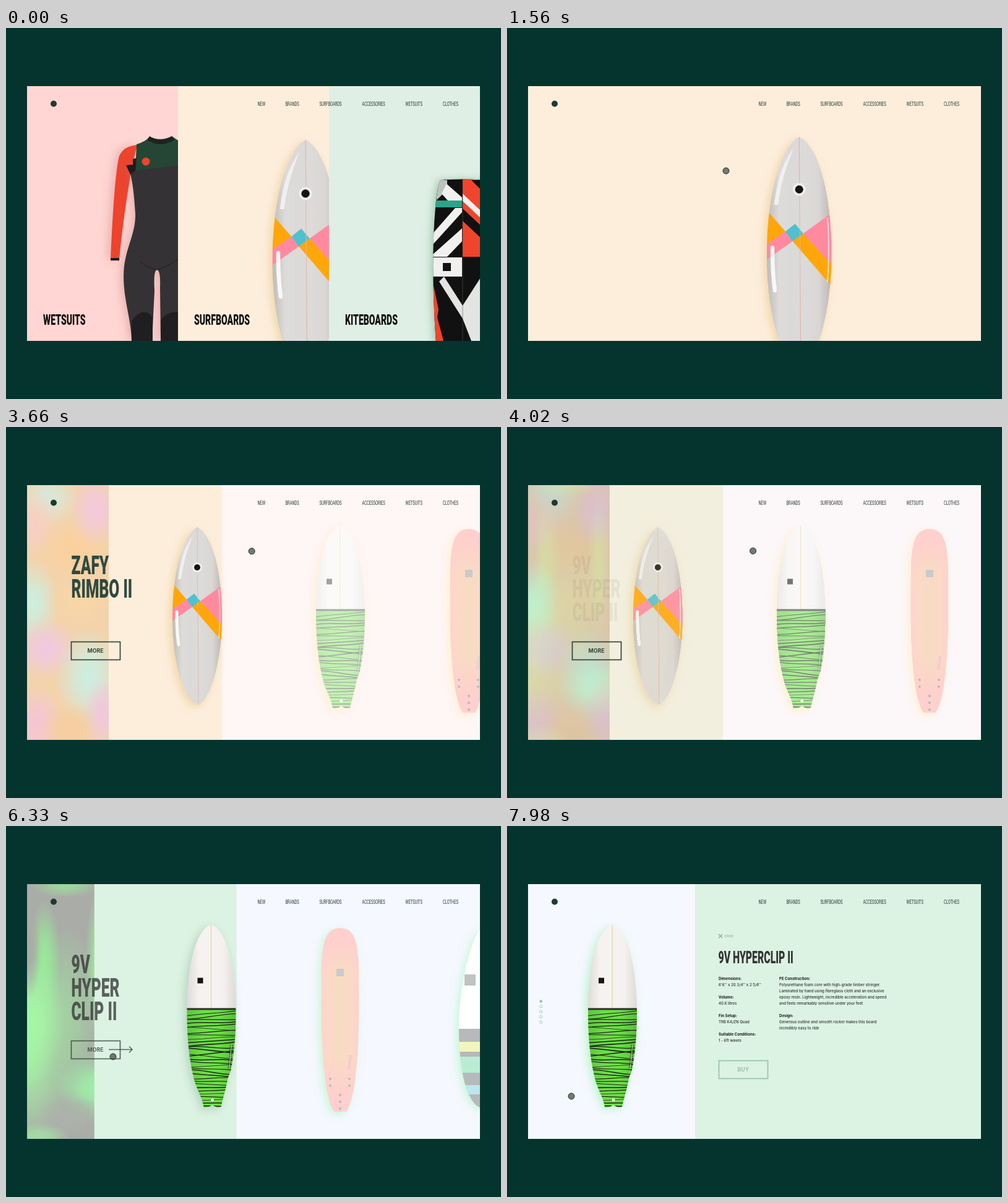
Recreate the animation shown at these times as an HTML page with a canvas. Size 800 by 600 pixels, loop 8 s.

```html
<!DOCTYPE html>
<html lang="en">
<head>
<meta charset="utf-8">
<title>Surf shop</title>
<style>
  html, body { margin: 0; width: 100%; height: 100%; overflow: hidden; background: #05342e; }
  canvas { display: block; }
</style>
</head>
<body>
<canvas id="stage" width="800" height="600"></canvas>
<script>
const LOOP = 8000;
const ctx = document.getElementById('stage').getContext('2d');
const DISPLAY = 'Roboto, "Liberation Sans", sans-serif';
const BODY = 'Inter, "Open Sans", sans-serif';

// Timing helpers
const ramp = (t, a, b) => Math.min(1, Math.max(0, (t - a) / (b - a)));
const inOut = u => u < .5 ? 4 * u ** 3 : 1 - 4 * (1 - u) ** 3;
const ease = (t, a, b) => inOut(ramp(t, a, b));
const mix = (a, b, k) => a + (b - a) * k;
const mixColor = (a, b, k) => a.map((v, i) => mix(v, b[i], k));
const rgb = c => `rgb(${c.map(Math.round).join(',')})`;

// Drawing helpers
function shape(c, fill, d) {
  c.fillStyle = fill;
  c.fill(new Path2D(d));
}
function line(c, color, width, d) {
  c.strokeStyle = color;
  c.lineWidth = width;
  c.stroke(new Path2D(d));
}
function dot(c, color, x, y, r) {
  c.fillStyle = color;
  c.beginPath();
  c.arc(x, y, r, 0, 7);
  c.fill();
}
function box(c, color, x, y, w, h) {
  c.fillStyle = color;
  c.fillRect(x, y, w, h);
}
function clipped(x, y, w, h, draw) {
  ctx.save();
  ctx.beginPath();
  ctx.rect(x, y, w, h);
  ctx.clip();
  draw();
  ctx.restore();
}
function faded(alpha, draw) {
  if (alpha <= 0) return;
  ctx.save();
  ctx.globalAlpha *= alpha;
  draw();
  ctx.restore();
}
function text(str, x, y, size, weight, color) {
  ctx.font = `${weight} ${size}px ${BODY}`;
  ctx.fillStyle = color;
  ctx.fillText(str, x, y);
}
// Condensed display lettering
function display(str, x, y, size, weight, color, narrow = .585) {
  ctx.save();
  ctx.translate(x, y);
  ctx.scale(narrow, 1);
  ctx.font = `${weight} ${size}px ${DISPLAY}`;
  ctx.fillStyle = color;
  ctx.fillText(str, 0, 0);
  ctx.restore();
}

// Prerendered boards: x is centred on 0, y runs from 150 to 470
function sprite(outline, paint) {
  const canvas = document.createElement('canvas');
  canvas.width = 240;
  canvas.height = 640;
  const c = canvas.getContext('2d');
  c.scale(2, 2);
  c.translate(60, -150);
  c.clip(new Path2D(outline));
  paint(c);
  return canvas;
}
function across(c, half, ...colors) {
  const g = c.createLinearGradient(-half, 0, half, 0);
  colors.forEach((color, i) => g.addColorStop(i / (colors.length - 1), color));
  return g;
}

const diamond = sprite(
  'M0 162C22 172 40 225 40 310C40 375 22 442 2 449C-22 445 -40 380 -40 310C-40 225 -20 172 0 162Z', c => {
  box(c, across(c, 41, '#bdb9b6', '#dedcda', '#dcdad8', '#dddbd9', '#d9d6d4', '#b9b5b2'), -60, 150, 120, 320);
  shape(c, '#f1f0ef', 'M-7 176C-20 194 -27 215 -31 246L-26 246C-22 216 -15 196 -7 176Z');
  shape(c, '#ffa60a', 'M-38 255L-17 279L-42 296ZM-8 291L5 281.5L42 322L42 349Z');
  shape(c, '#ff8a9f', 'M-42 296L-17 279L-8 291L-42 315ZM5 281.5L42 255L42 322Z');
  shape(c, '#4fc0cd', 'M-17 279L-5 269.5L5 281.5L-8 291Z');
  line(c, '#e3b5ae', .8, 'M0 162L2 449');
  line(c, 'rgba(255,255,255,.65)', 1.6, 'M35 262Q38 300 35 342');
  c.lineCap = 'round';
  line(c, '#f8f8f7', 5, 'M-33 299Q-33 330 -30 352');
  dot(c, '#efeeee', 0, 227, 8);
  dot(c, '#151515', 0, 227, 5);
});

const fish = sprite(
  'M0 160C18 164 39 205 40 300C40 345 36 375 32 395L27 408C24 425 19 440 16 454Q8 456 2 451Q-6 456 -12 455' +
  'C-14 440 -22 428 -26 415C-36 380 -39 340 -39 300C-39 205 -18 164 0 160Z', c => {
  box(c, across(c, 40, '#dedad8', '#f5f2f0', '#f6f4f2', '#f4f1ef', '#dddad8'), -60, 150, 120, 320);
  line(c, '#e2d3a0', 1.2, 'M0 160V296');
  box(c, across(c, 40, '#5cc43c', '#6ddd48', '#6ddd48', '#58bd3a'), -60, 296, 120, 170);
  let seed = 11;
  const random = () => (seed = seed * 16807 % 2147483647) / 2147483647;
  for (let y = 303; y < 455; y += 5) {
    const tilt = random() * 10 - 5, bend = random() * 12 - 6;
    line(c, '#17260f', .7 + random() * 1.1,
      `M-45 ${y - tilt}C-15 ${y + bend} 15 ${y - bend} 45 ${y + tilt}`);
  }
  box(c, '#2c2f2a', -60, 294.5, 120, 3);
  box(c, '#151515', -22, 245.5, 9, 9);
  c.setLineDash([2, 1.5]);
  line(c, '#1d2a18', 4, 'M33 354L29 394');
  line(c, '#d8efcf', 1.5, 'M33 354L29 394');
  dot(c, '#eef5ea', 2, 443, 2.5);
});

const longboard = sprite(
  'M0 165C22 165 29 185 30 230C31 310 31 370 22 425C18 445 13 460 9 462H-9' +
  'C-13 460 -18 445 -22 425C-31 370 -31 310 -30 230C-29 185 -22 165 0 165Z', c => {
  box(c, across(c, 31, '#ff9585', '#f5a272', '#eca868', '#f5a272', '#ff9083'), -60, 150, 120, 320);
  for (const [from, to] of [[165, 235], [462, 370]]) {
    const g = c.createLinearGradient(0, from, 0, to);
    g.addColorStop(0, '#ff8a84');
    g.addColorStop(.3, '#ff8a84');
    g.addColorStop(1, '#ff8a8400');
    box(c, g, -60, 150, 120, 320);
  }
  box(c, '#7b7a80', -6, 231, 12, 12);
  c.setLineDash([2, 1]);
  line(c, '#d0807f', 5, 'M17 371L14 393');
  for (const y of [409, 420]) for (const x of [-16, 15]) dot(c, '#55525a', x, y, 1.9);
  for (const y of [435, 446, 457]) dot(c, '#55525a', 0, y, 2);
});

const striped = sprite(
  'M0 165C-14 178 -36 250 -36 330C-36 400 -22 450 0 456C22 450 36 400 36 330C36 250 14 178 0 165Z', c => {
  box(c, '#ffffff', -60, 150, 120, 320);
  box(c, '#62676a', -27, 240, 18, 18);
  box(c, '#4b5155', -60, 328, 120, 140);
  box(c, '#dce85c', -60, 349, 120, 16);
  box(c, '#4fd395', -60, 373, 120, 26);
  box(c, '#55c3d6', -60, 419, 120, 15);
});

// A glowing white silhouette with the board at the given strength on top
function drawBoard(board, x, visible, strength, glow, tipY = 162, scale = 1) {
  const area = [x - 60 * scale, tipY - 12 * scale, 120 * scale, 320 * scale];
  faded(visible, () => {
    ctx.filter = strength < 1 ? 'brightness(0) invert(1)' : 'none';
    ctx.shadowColor = glow;
    ctx.shadowBlur = 14;
    ctx.shadowOffsetX = -4;
    ctx.shadowOffsetY = 4;
    ctx.drawImage(board, ...area);
  });
  if (strength < 1) faded(visible * strength, () => ctx.drawImage(board, ...area));
}

// Blurred colour strips
function strip(base, blobs) {
  const canvas = document.createElement('canvas');
  canvas.width = 132;
  canvas.height = 412;
  const c = canvas.getContext('2d');
  box(c, base, 0, 0, 132, 412);
  for (const [x, y, rx, ry, color] of blobs) {
    c.save();
    c.translate(x, y);
    c.scale(1, ry / rx);
    const g = c.createRadialGradient(0, 0, 0, 0, 0, rx);
    g.addColorStop(0, color);
    g.addColorStop(.35, color + 'cc');
    g.addColorStop(1, color + '00');
    box(c, g, -rx, -rx, 2 * rx, 2 * rx);
    c.restore();
  }
  return canvas;
}
const pastel = strip('#f3d3ac', [
  [36, 20, 50, 45, '#d9e8d8'], [8, 65, 45, 55, '#f8cfc4'], [75, 105, 60, 50, '#fbd09c'],
  [110, 40, 40, 60, '#f2c8de'], [10, 190, 40, 70, '#cdeede'], [85, 185, 50, 50, '#f8d6a6'],
  [30, 265, 55, 50, '#f0c9e0'], [100, 310, 55, 80, '#cdeee2'], [15, 385, 45, 60, '#f5c5d5'],
  [70, 395, 50, 45, '#f6cda0'], [125, 370, 35, 60, '#f0c8dc']]);
const moss = strip('#aaaca7', [
  [0, 260, 80, 160, '#a4f0a4'], [62, 215, 60, 150, '#a3cfa2'], [28, 125, 26, 100, '#98ea98'],
  [8, 220, 55, 100, '#a6f6a6'], [114, 130, 20, 120, '#9de59d'], [110, 330, 62, 55, '#9ef0a8'],
  [62, 2, 55, 20, '#9fd89f'], [4, 105, 18, 80, '#aaaca7'], [70, 375, 55, 35, '#adb3aa'],
  [20, 408, 50, 22, '#a6dba6']]);

function drawWetsuit() {
  ctx.save();
  ctx.shadowColor = 'rgba(190,110,110,.35)';
  ctx.shadowBlur = 14;
  ctx.shadowOffsetX = -5;
  shape(ctx, '#ee432c', 'M212 189Q190 191 183 207C176 235 172 310 169 375L183 376C187 330 194 280 203 228Z');
  shape(ctx, '#343235',
    'M197 222L290 215V506H250L249 420Q250 392 244 391Q238 392 240 425L236 506H203' +
    'C203 470 186 430 191 385C196 350 210 330 209 300C207 270 205 245 197 222Z');
  ctx.restore();
  box(ctx, '#1c1b1d', 169, 372, 14, 4);
  shape(ctx, '#254634', 'M211 188Q225 184 232 176Q250 184 268 175L290 190V221L209 230Z');
  shape(ctx, '#1c2420', 'M232 175Q250 186 268 175L272 181Q250 195 228 181Z');
  shape(ctx, '#1d1c1e', 'M211 210L209 231L201 237L194 222L205 221V212Z');
  line(ctx, '#1e1d1f', 1, 'M216 377Q228 388 243 391Q258 388 278 374');
  shape(ctx, '#1f1e20', 'M203 506V474Q222 448 237 468V506ZM250 506V474Q260 455 290 460V506Z');
  dot(ctx, '#e8452f', 226, 216, 6.5);
}

function drawKite() {
  ctx.save();
  ctx.shadowColor = 'rgba(110,170,130,.5)';
  ctx.shadowBlur = 12;
  ctx.shadowOffsetX = -4;
  const outline = 'M702 246Q735 243 780 246V510H695Q686 380 694 290Q696 262 702 246Z';
  shape(ctx, '#111', outline);
  ctx.restore();
  ctx.save();
  ctx.clip(new Path2D(outline));
  box(ctx, '#f0452c', 738, 244, 30, 126);
  shape(ctx, '#bfc3c0', 'M700 246H713V262L695 279Z');
  shape(ctx, '#f0f0ee',
    'M712 252L737 274V279H714L704 268ZM690 332L726 291H737V298L690 350ZM690 370V366L737 324V345L713 370Z' +
    'M738 268L768 296V308L738 280Z');
  shape(ctx, '#111', 'M738 292L768 320V340L738 312ZM752 246H768V262Z');
  box(ctx, '#2aa58a', 690, 279, 47, 11);
  box(ctx, '#f0f0ee', 690, 371, 47, 31);
  box(ctx, '#111', 706, 380, 13, 13);
  shape(ctx, '#e4e4e2', 'M708 402L738 449L768 402V506H738V470L700 410Z');
  shape(ctx, '#111', 'M715 402H762L738 438ZM738 506V470L752 506Z');
  shape(ctx, '#f0452c', 'M690 412L699 455L697 468L707 506H690Z');
  line(ctx, '#555', .6, 'M738 246V506');
  ctx.restore();
}

const CREAM = [253, 238, 220], MINT = [220, 242, 226];
const IVORY = [254, 255, 240], BLUSH = [255, 246, 246], ICE = [245, 248, 255];
const GOLD_GLOW = 'rgba(228,190,110,.5)';

function drawDiamond(t, slide) {
  const x = mix(484, 309, ease(t, 1150, 2750)) - 208 * slide;
  const tipY = mix(181, 162, ease(t, 1100, 2250));
  const scale = mix(1.335, 1, ease(t, 1300, 2250));
  drawBoard(diamond, x, 1 - ramp(slide, .2, .9), 1, GOLD_GLOW, tipY, scale);
}

function drawCategories(t) {
  const open = ease(t, 100, 1100);
  box(ctx, '#ffd6d3', 34, 94, 244, 412);
  box(ctx, '#dfefe5', 522, 94, 244, 412);
  clipped(34, 94, 244, 412, drawWetsuit);
  drawKite();
  display('WETSUITS', 60, 480, 24, 900, '#111');
  display('KITEBOARDS', 548, 480, 24, 900, '#111');
  const left = mix(278, 34, open), right = mix(522, 766, open);
  clipped(left, 94, right - left, 412, () => {
    box(ctx, rgb(CREAM), 34, 94, 732, 412);
    drawDiamond(t, 0);
    faded(1 - ramp(t, 150, 600), () => display('SURFBOARDS', 304, 480, 24, 900, '#111'));
  });
}

function drawHeadline(lines, color) {
  lines.forEach((str, i) => display(str, 105.5, 238 + 38 * i, 42, 800, color));
}

function drawButton(label, x, y, textX, color) {
  ctx.strokeStyle = color;
  ctx.lineWidth = 1.7;
  ctx.strokeRect(x, y, 79, 29);
  text(label, textX, y + 17.5, 8.8, 700, color);
}

function drawSlides(t) {
  const arrive = ease(t, 1150, 2750);
  const slide = ease(t, 3700, 4450);
  const detail = ease(t, 6200, 7600);
  const leave = ramp(t, 6250, 6600);

  const side = mixColor(mixColor(IVORY, BLUSH, ramp(t, 2300, 3200)), ICE, slide);
  box(ctx, rgb(side), 34, 94, 732, 412);
  ctx.drawImage(pastel, 34, 94);
  faded(slide, () => ctx.drawImage(moss, 34, 94));

  const half = 91.5 + 417 * ((1 - ramp(t, 1712, 3467)) ** 3 + ease(t, 6080, 7120));
  box(ctx, rgb(mixColor(CREAM, MINT, slide)), 257.7 - half, 94, 2 * half, 412);
  box(ctx, rgb(ICE), 34, 94, 270 * ease(t, 6600, 7700), 412);

  const offset = 90 * (1 - arrive) - 208 * slide;
  const shown = ramp(t, 1750, 2200);
  const glow = slide < .5 ? 'rgba(255,240,205,.9)' : 'rgba(170,245,185,.6)';
  const waiting = shown * (1 - ramp(t, 6400, 6800));
  const away = 60 * ease(t, 6350, 7000);
  drawBoard(longboard, 748 + offset + away, waiting, .4, glow);
  drawBoard(striped, 976 + offset + away, waiting, .4, glow);
  drawDiamond(t, slide);
  const fishGlow = detail > .5 ? 'rgba(150,240,165,.6)' : slide > .5 ? 'rgba(120,165,135,.4)' : glow;
  drawBoard(fish, 540 + offset - 162 * detail, shown, mix(.4, 1, slide), fishGlow);

  const intro = ramp(t, 2600, 3000);
  faded(intro * (1 - ramp(t, 3680, 3950)), () => drawHeadline(['ZAFY', 'RIMBO II'], '#2f4a3f'));
  faded(ramp(t, 4000, 4300) * (1 - leave), () => drawHeadline(['9V', 'HYPER', 'CLIP II'], '#333534'));
  faded(intro * (1 - leave), () => {
    const ink = rgb(mixColor([42, 72, 60], [50, 62, 53], slide));
    drawButton('MORE', 105.5, 347.5, 131.5, ink);
    const arrow = ease(t, 5400, 5800);
    faded(arrow, () => {
      const tip = mix(180, 204, arrow);
      line(ctx, ink, 1.6, `M166 361.5H${tip}m-5 -5l5 5l-5 5`);
    });
  });
}

const SPECS = [
  [342, 249, 'Dimensions:', "6'6'' x 20 3/4'' x 2 5/8''"],
  [342, 279, 'Volume:', '40.6 litres'],
  [342, 309, 'Fin Setup:', 'TRB K4/ZN Quad'],
  [342, 338.7, 'Suitable Conditions:', '1 - 6ft waves'],
  [440, 249, 'PE Construction:', 'Polyurethane foam core with high-grade timber stringer.',
    'Laminated by hand using fibreglass cloth and an exclusive',
    'epoxy resin. Lightweight, incredible acceleration and speed',
    'and feels remarkably sensitive under your feet'],
  [440, 309, 'Design:', 'Generous outline and smooth rocker makes this board', 'incredibly easy to ride']
];

function drawDetail(t) {
  const reveal = (y, draw) => faded(ramp(t, 7150 + (y - 178) * 1.5, 7550 + (y - 178) * 1.5), draw);
  reveal(178, () => {
    line(ctx, '#8aa898', 1.3, 'M342 175l6 6m0 -6l-6 6');
    text('close', 351, 180, 5.8, 600, '#9abfa9');
  });
  reveal(212, () => display('9V HYPERCLIP II', 341.5, 222, 27, 800, '#333534'));
  for (const [x, y, label, ...lines] of SPECS) {
    reveal(y, () => {
      text(label, x, y, 6.1, 700, '#151a17');
      lines.forEach((str, i) => text(str, x, y + 9.9 * (i + 1), 6.1, 500, '#2b302d'));
    });
  }
  reveal(394, () => drawButton('BUY', 342.5, 379.5, 372.5, '#98c3a8'));
  faded(ramp(t, 6900, 7300), () => {
    for (let i = 0; i < 5; i++) {
      ctx.beginPath();
      ctx.arc(54.8, 283.5 + 8.4 * i, 2.1, 0, 7);
      ctx.strokeStyle = ctx.fillStyle = '#9ccbad';
      ctx.lineWidth = .9;
      ctx.stroke();
      if (!i) ctx.fill();
    }
  });
}

function drawNav() {
  dot(ctx, '#1d3a33', 77, 122.5, 5);
  const items = { NEW: 406.5, BRANDS: 451.5, SURFBOARDS: 506.5, ACCESSORIES: 575.5, WETSUITS: 645.5, CLOTHES: 706 };
  for (const label in items) display(label, items[label], 125.6, 8.4, 400, '#25342d', .69);
}

const CURSOR = [[300, 330, 250], [1560, 354, 231], [2250, 374, 216], [3400, 397, 201],
  [4500, 398, 200], [5500, 173, 373], [6500, 173, 373], [7300, 104, 437]];

function drawCursor(t) {
  let i = 0;
  while (i < CURSOR.length - 2 && t > CURSOR[i + 1][0]) i++;
  const [t0, x0, y0] = CURSOR[i], [t1, x1, y1] = CURSOR[i + 1];
  const u = ramp(t, t0, t1), k = u * u * (3 - 2 * u);
  faded(ramp(t, 200, 400), () => {
    dot(ctx, 'rgba(70,80,72,.75)', mix(x0, x1, k), mix(y0, y1, k), 5);
    ctx.strokeStyle = '#26302b';
    ctx.lineWidth = 1;
    ctx.stroke();
  });
}

function frame(now) {
  const t = now % LOOP;
  box(ctx, '#05342e', 0, 0, 800, 600);
  clipped(34, 94, 732, 412, () => {
    if (t < 1712) drawCategories(t);
    else drawSlides(t);
    drawDetail(t);
    drawNav();
    drawCursor(t);
  });
  requestAnimationFrame(() => frame(performance.now()));
}
frame(0);
</script>
</body>
</html>
```
